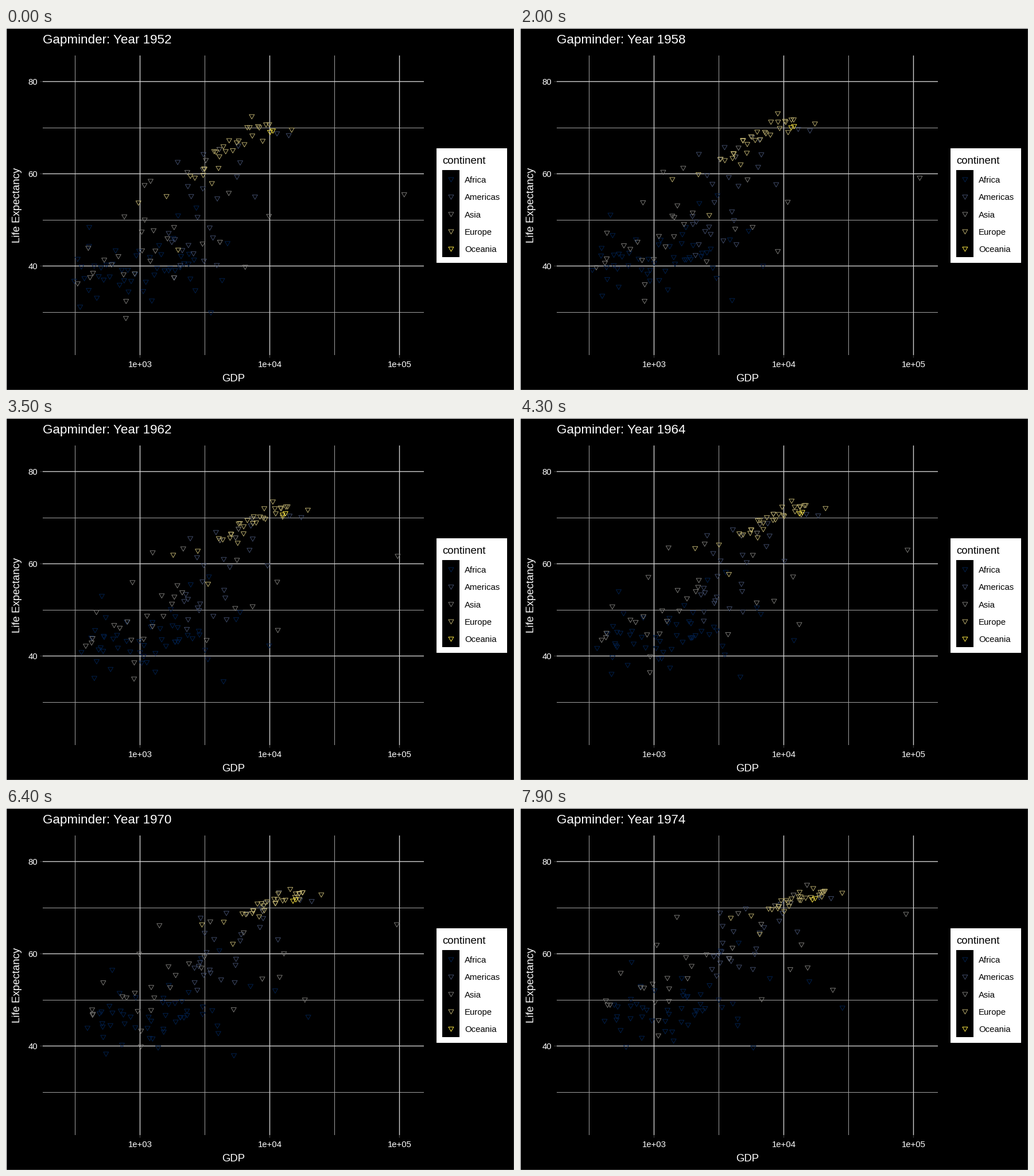
A matplotlib script for the animation above (8000 ms loop, 885 by 632 pixels).

```python
import numpy as np
import matplotlib.pyplot as plt
from matplotlib.animation import FuncAnimation
from matplotlib.collections import PolyCollection
from matplotlib.patches import Rectangle

W, H, DPI = 885, 632, 64
PX = 72 / DPI                      # points per pixel
FRAMES, STEP = 80, 55 / 199        # years per frame
plt.rcParams["font.family"] = "Liberation Sans"
rng = np.random.default_rng(7)

COLORS = {"Africa": "#00204d", "Americas": "#414d6b", "Asia": "#7c7b78",
          "Europe": "#bcaf6f", "Oceania": "#ffea46"}

# GDP and life expectancy in 1952 for points that stand apart.
AFRICA = [(4725, 45), (3521, 30), (2719, 52.7), (1968, 51), (407, 48.5), (2670, 34.8)]
OIL = [(2388, 42.7), (4293, 37)]
AMERICAS = [(11367, 68.8), (13990, 68.4), (5717, 66.1), (3082, 64.3), (1953, 62.6),
            (5911, 62.5), (7690, 55.1), (5587, 59.4), (3940, 54.7), (2480, 55.2),
            (1840, 37.6)]
ASIA = [(9867, 50.9), (4835, 55.9), (1084, 57.6), (758, 50.8), (779, 28.8), (782, 32.5),
        (400, 44), (605, 40.4), (1831, 48.5), (1273, 47.8), (331, 36.3)]
BOOM = [(6460, 39.9), (1828, 37.6), (3054, 61), (2315, 60.4), (3217, 63), (1207, 58.5),
        (1031, 47.5), (1088, 50.1), (3035, 44.9), (4087, 65.4), (4130, 45.3)]
EUROPE = [(974, 53.8), (1601, 55.2), (1969, 43.6), (2444, 59.6), (2648, 59.2),
          (3068, 59.8), (3119, 61.2), (3145, 61.1), (4029, 61.3), (3581, 58),
          (14734, 69.6), (7268, 72.5)]
OCEANIA = [(10040, 69.1), (10557, 69.4)]
RICHEST = [108382, 113523, 95458, 80895, 109348, 59265]   # every five years


def listed(rows):
    gdp, life = np.array(rows, float).T
    return np.column_stack([np.log10(gdp), life])


def band(n, x0, x1, life0, life1, noise):
    """Points along a sloping band, scattered in height."""
    u = (np.arange(n) + rng.uniform(0, 1, n)) / n
    return np.column_stack([x0 + (x1 - x0) * u,
                            life0 + (life1 - life0) * u + rng.normal(0, noise, n)])


starts, ends, bends, colors = [], [], [], []


def group(name, pts, growth, gain, catch_up=0, converge=0, bend=0.1, spread=0):
    """Add points with their place 20 years later."""
    x, life = pts.T
    dx = growth - converge * (x - 3.6) + rng.normal(0, 1, len(x)) * spread
    dlife = gain + catch_up * (72 - life)
    starts.append(pts)
    ends.append(np.column_stack([x + dx, life + dlife]))
    bends.extend([bend] * len(x))
    colors.extend([COLORS[name]] * len(x))


group("Africa", band(44, 2.48, 3.42, 36.5, 41.5, 3.6), .16, 8, spread=.1)
group("Africa", listed(AFRICA), .2, 9)
group("Africa", listed(OIL), .75, 10.5)
group("Americas", band(14, 3.2, 3.6, 47, 50, 5.5), .2, 1.9, .42, spread=.1)
group("Americas", listed(AMERICAS), .2, 1.9, .42)
group("Asia", band(10, 2.57, 3.24, 36.2, 45, 1.7), .14, 10.5, spread=.07)
group("Asia", listed(ASIA), .13, 8.2, .1)
group("Asia", listed(BOOM), .52, 8.2, .1)
group("Asia", listed([(RICHEST[0], 55.6)]), 0, 12.1)
richest = len(colors) - 1
group("Europe", band(18, 3.55, 4.02, 64, 71.2, 1.1), .4, 2, .63, .25, .5, .04)
group("Europe", listed(EUROPE), .4, 2, .63, .25, .5)
group("Oceania", listed(OCEANIA), .2, 2.6, bend=.5)

starts, ends, bends = np.vstack(starts), np.vstack(ends), np.array(bends)
TRIANGLE = np.array([(-4.47, -2.58), (4.47, -2.58), (0, 5.16)])


def centers_at(years):
    u = years / 20
    x, life = (starts + (ends - starts) * u).T.copy()
    life += (ends - starts)[:, 1] * bends * u * (1 - u)
    x[richest] = np.interp(years / 5, range(len(RICHEST)), np.log10(RICHEST))
    return np.column_stack([233.4 + 226.2 * (x - 3), 415.7 - 8.06 * (life - 40)])


fig = plt.figure(figsize=(W / DPI, H / DPI), dpi=DPI, facecolor="black")
ax = fig.add_axes([0, 0, 1, 1])
ax.set(xlim=(0, W), ylim=(H, 0))
ax.axis("off")


def line(x0, y0, x1, y1, color, width):
    ax.plot([x0, x1], [y0, y1], color=color, lw=width * PX, snap=False,
            solid_capstyle="butt", zorder=1)


def label(x, y, text, size, color="white", **kw):
    return ax.text(x, y, text, size=size * PX, color=color, va="baseline", **kw)


def box(x, y, w, h, color):
    ax.add_patch(Rectangle((x, y), w, h, fc=color, ec="none", zorder=2))


def triangles(centers, edge):
    return ax.add_collection(PolyCollection(
        centers[:, None, :] + TRIANGLE, facecolors="none", edgecolors=edge,
        linewidths=0.95 * PX, zorder=3), autolim=False)


MAJOR, MINOR, TICK = ("#d0d0d0", 1.4), ("#a0a0a0", 1), ("#333333", 1.4)
TITLE, HEAD, SMALL = 22.4, 18.67, 14.93
LEFT, RIGHT, TOP, BOTTOM = 64, 728, 48, 571

ax.add_patch(Rectangle((0, 0), W, H, fill=False, ec="white", lw=1.4 * PX))
for i in range(3):
    line(120.5 + 226 * i, TOP, 120.5 + 226 * i, BOTTOM, *MINOR)
    line(LEFT, 174.5 + 161 * i, RIGHT, 174.5 + 161 * i, *MINOR)
for i in range(3):
    x, y = 233.5 + 226 * i, 93.5 + 161 * i
    line(x, TOP, x, BOTTOM, *MAJOR)
    line(x, BOTTOM, x, BOTTOM + 4.7, *TICK)
    label(x, 592.5, f"1e+0{3 + i}", SMALL, ha="center")
    line(LEFT, y, RIGHT, y, *MAJOR)
    line(LEFT - 4.7, y, LEFT, y, *TICK)
    label(55, y + 5.5, f"{80 - 20 * i}", SMALL, ha="right")

title = label(LEFT, 27, "", TITLE)
label(396.3, 617, "GDP", HEAD, ha="center")
label(24.5, 309.5, "Life Expectancy", HEAD, ha="center",
      rotation=90, rotation_mode="anchor")

box(750, 210, 122.5, 199.5, "white")
box(760, 248, 30.3, 152, "black")
label(760, 237, "continent", HEAD, "black")
keys = np.array([(775.4, 263.7 + 30.3 * i) for i in range(5)])
for (_, y), name in zip(keys, COLORS):
    label(799, y + 6.3, name, SMALL, "black")
triangles(keys, list(COLORS.values()))
points = triangles(centers_at(0), colors)


def update(i):
    years = i * STEP
    points.set_verts(centers_at(years)[:, None, :] + TRIANGLE)
    title.set_text(f"Gapminder: Year {round(1952 + years)}")
    return points, title


anim = FuncAnimation(fig, update, frames=FRAMES, interval=100,
                     repeat=True, repeat_delay=0, blit=False)
plt.show()
```
